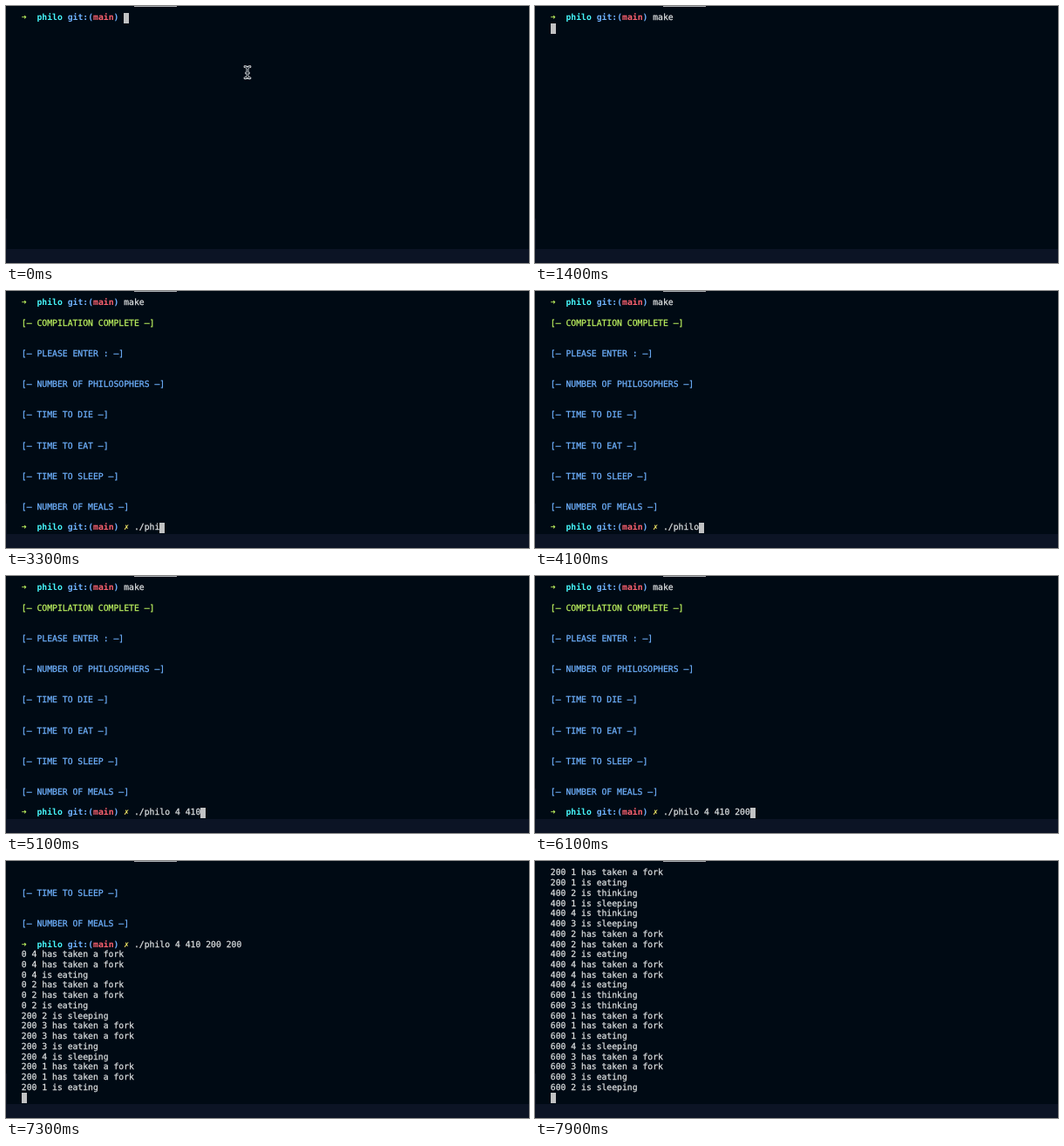
Animation, 600 px wide and 295 px high, one loop 8000 ms. Source, as an HTML page:

```html
<!DOCTYPE html>
<html lang="en">
<head>
<meta charset="utf-8">
<title>Terminal</title>
<style>
html, body { margin: 0; width: 100%; height: 100%; overflow: hidden; background: #000a14; }
#stage { position: absolute; left: 0; top: 0; width: 600px; height: 295px; overflow: hidden; background: #000a14; }
#stage > * { position: absolute; }
#bar { left: 0; top: 279px; width: 600px; height: 16px; background: #0c1425; }
#edge { left: 0; top: 244px; width: 1px; height: 35px; background: #0c1425; }
#tab { left: 147px; top: 0; width: 49px; height: 1px; background: #a9aeb2; }
#screen {
  left: 17.8px; top: 8.4px; color: #dcdfe0;
  font: 9.76px/11.73px "DejaVu Sans Mono", Menlo, monospace;
  text-rendering: geometricPrecision; font-variant-ligatures: none;
  -webkit-text-stroke: 0.25px;
}
.row { position: absolute; left: 0; white-space: pre; height: 11.73px; }
.cell, .cursor { display: inline-block; vertical-align: top; }
.cell { width: 5.876px; height: 11.73px; }
.cursor { width: 6px; height: 12.3px; margin-top: -0.6px; background: #c1c2c3; }
.green { color: #bdf25f; }
.blue { color: #6fb2ff; }
.cyan { color: #46f6fa; }
.red { color: #ff6270; }
.yellow { color: #fdf26a; }
b { font-weight: 700; -webkit-text-stroke: 0; }
#mouse { left: 270px; top: 66px; }
</style>
</head>
<body>
<div id="stage">
  <div id="bar"></div>
  <div id="edge"></div>
  <div id="tab"></div>
  <div id="screen"></div>
  <svg id="mouse" width="14" height="20" fill="none" stroke-linecap="round" stroke-linejoin="round">
    <defs>
      <path id="beam" d="M4 3.7Q7 3.7 7 6Q7 3.7 10 3.7M7 6V14.6M5.6 10.9H8.4M4 16.8Q7 16.8 7 14.6Q7 16.8 10 16.8"/>
    </defs>
    <use href="#beam" stroke="#e4e7e9" stroke-width="2.8"/>
    <use href="#beam" stroke="#000a14" stroke-width="1"/>
  </svg>
</div>
<script>
const LOOP = 8000, ROWS = 23, LINE = 11.73;
const screen = document.getElementById("screen");
const mouse = document.getElementById("mouse");

// Time at which each character has been typed.
const MAKE = { text: "make", at: [700, 900, 1000, 1200], enter: 1400, done: 1800 };
const RUN = {
  text: "./philo 4 410 200 200",
  at: [2800, 2900, 3100, 3200, 3300, 3400, 3600, 4300, 4600, 4700, 4900,
       5000, 5100, 5300, 5600, 5800, 5900, 6200, 6500, 6700, 6800],
  enter: 7200
};

// Philosopher number and action: f takes two forks and eats, s sleeps, t thinks.
const LOG = [
  [7200, 0, "4f 2f"],
  [7300, 200, "2s 3f 4s 1f"],
  [7500, 400, "2t 1s 4t 3s 2f 4f"],
  [7800, 600, "1t 3t 1f 4s 3f 2s"]
];
const FORK = "has taken a fork";
const ACTIONS = { f: [FORK, FORK, "is eating"], s: ["is sleeping"], t: ["is thinking"] };

const tint = (color, text) => `<span class="${color}">${text}</span>`;
const bold = (color, text) => `<b class="${color}">${text}</b>`;
const cell = (color, sign) => `<b class="cell ${color}">${sign}</b>`;
const banner = (color, text) => tint(color, `[– ${text} –]`);
const CURSOR = '<span class="cursor"></span>';

const prompt = dirty =>
  cell("green", "➜") + "  " + bold("cyan", "philo") + " " +
  bold("blue", "git:(") + bold("red", "main") + bold("blue", ")") + " " +
  (dirty ? cell("yellow", "✗") + " " : "");

const HELP = ["PLEASE ENTER :", "NUMBER OF PHILOSOPHERS", "TIME TO DIE",
  "TIME TO EAT", "TIME TO SLEEP", "NUMBER OF MEALS"];
const BUILD = ["", banner("green", "COMPILATION COMPLETE"),
  ...HELP.flatMap(s => ["", "", banner("blue", s)]), ""];

const typed = (cmd, t) => cmd.text.slice(0, cmd.at.filter(a => a <= t).length);

function logLines(t) {
  return LOG.filter(([at]) => at <= t).flatMap(([, ms, acts]) =>
    acts.split(" ").flatMap(([who, act]) =>
      ACTIONS[act].map(s => `${ms} ${who} ${s}`)));
}

function linesAt(t) {
  const lines = [prompt(false) + typed(MAKE, t)];
  if (t >= MAKE.done) lines.push(...BUILD, prompt(true) + typed(RUN, t));
  else if (t >= MAKE.enter) lines.push("");
  if (t >= RUN.enter) lines.push(...logLines(t), "");
  lines[lines.length - 1] += CURSOR;
  return lines.slice(-ROWS);
}

let shown = "";
function draw(t) {
  const html = linesAt(t).map((s, i) =>
    `<div class="row" style="top:${(i * LINE).toFixed(2)}px">${s}</div>`).join("");
  if (html !== shown) screen.innerHTML = shown = html;
  mouse.style.visibility = t < MAKE.at[0] ? "visible" : "hidden";
}

const start = performance.now();
function tick(now) {
  draw(Math.max(0, now - start) % LOOP);
  requestAnimationFrame(tick);
}
draw(0);
requestAnimationFrame(tick);
</script>
</body>
</html>
```
